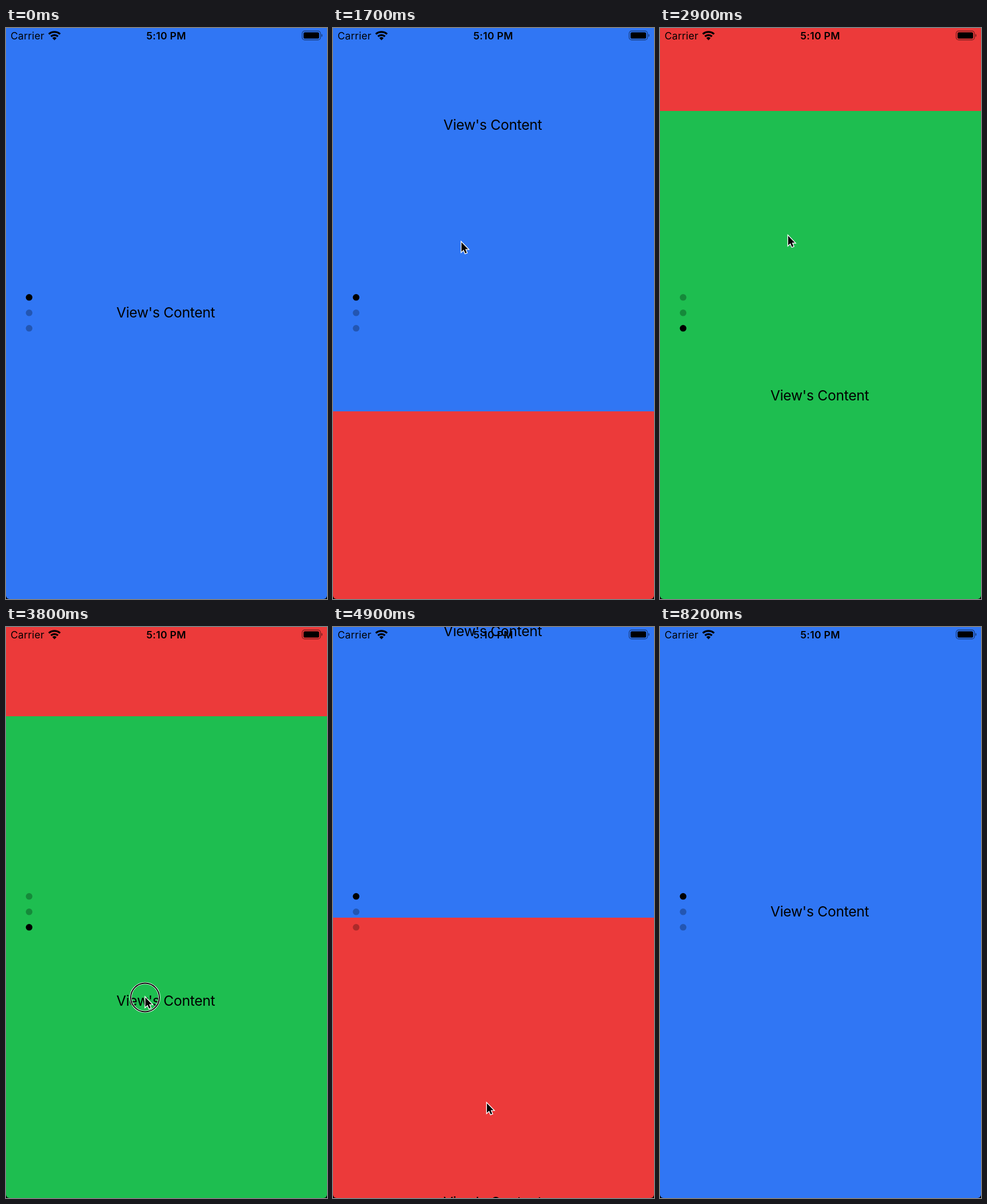
An HTML page with a canvas for the animation above (8.3 s loop, 561 by 998 pixels).

```html
<!DOCTYPE html>
<html lang="en">
<head>
<meta charset="utf-8">
<title>Vertical pages</title>
<style>
  html, body { margin: 0; width: 100%; height: 100%; overflow: hidden; background: #000; }
  #stage {
    position: absolute; left: 0; top: 0; width: 561px; height: 998px; overflow: hidden;
    border-radius: 0 0 6px 6px; color: #000; font-family: Inter, Roboto, sans-serif;
  }
  .page {
    position: absolute; left: 0; top: 0; width: 558.4px; padding-right: 2.6px; height: 998px;
    line-height: 995px; font-size: 24.6px; letter-spacing: -0.27px; text-align: center;
    white-space: nowrap;
  }
  .bar { position: absolute; top: 0; line-height: 27px; font-size: 17.6px; white-space: nowrap; }
  #carrier { left: 8px; letter-spacing: 0.2px; }
  #clock { left: 0; width: 560px; text-align: center; font-weight: 600; letter-spacing: 0.3px; }
  canvas { position: absolute; left: 0; top: 0; }
</style>
</head>
<body>
<div id="stage">
  <div class="page" style="background:#3076f4">View's Content</div>
  <div class="page" style="background:#ec3a3a">View's Content</div>
  <div class="page" style="background:#1ebe50">View's Content</div>
  <div class="bar" id="carrier">Carrier</div>
  <div class="bar" id="clock">5:10 PM</div>
  <canvas id="overlay" width="561" height="998"></canvas>
</div>
<script>
const LOOP = 8300, STEP = 100, H = 998;
const pages = [...document.querySelectorAll('.page')];
const ctx = document.getElementById('overlay').getContext('2d');

// Each swipe: finger down, drag start, release, settle time, page change, dragged distance
const swipes = [
  { press: 1300, start: 1400, release: 1700, settle: 500, dir: 1, drag: 328 },
  { press: 2400, start: 2400, release: 2700, settle: 500, dir: 1, drag: 328 },
  { press: 3500, start: 3600, release: 3850, settle: 440, dir: -1, drag: 218 },
  { press: 4500, start: 4600, release: 4850, settle: 450, dir: -1, drag: 300 }
];

// Pointer path: time, x, y
const path = [
  [1000, 40, 640], [1300, 228, 735], [1400, 228, 735], [1700, 224.5, 374.5],
  [1900, 222, 345], [2300, 215.5, 726], [2400, 215.5, 725], [2700, 222, 370],
  [3000, 225, 360], [3500, 240, 478], [3600, 240, 482], [3800, 243.5, 647.5],
  [3900, 246, 750], [4100, 252, 790], [4500, 281, 530.5], [4600, 281, 530.5],
  [4850, 270, 820], [5000, 267, 857.5], [6100, 267, 857.5], [6400, 12, 810]
];

function scrollAt(t) {
  let y = 0;
  for (const s of swipes) {
    if (t <= s.start) break;
    let d;
    if (t < s.release) {
      d = s.drag * ((t - s.start) / (s.release - s.start)) ** 1.5;
    } else {
      const u = Math.min(1, (t - s.release) / s.settle);
      d = H - (H - s.drag) * (1 - u) ** 3;
    }
    y += s.dir * d;
  }
  return y;
}

function pointerAt(t) {
  for (let i = 1; i < path.length; i++) {
    const a = path[i - 1], b = path[i];
    if (t >= a[0] && t < b[0]) {
      const u = (t - a[0]) / (b[0] - a[0]);
      return [a[1] + (b[1] - a[1]) * u, a[2] + (b[2] - a[2]) * u];
    }
  }
  return null;
}

function disc(x, y, r, alpha) {
  ctx.fillStyle = `rgba(0,0,0,${alpha})`;
  ctx.beginPath();
  ctx.arc(x, y, r, 0, Math.PI * 2);
  ctx.fill();
}

function roundBox(x, y, w, h, r) {
  ctx.beginPath();
  ctx.roundRect(x, y, w, h, r);
}

function drawStatus() {
  const x = 84.7, y = 21.6, half = 0.73, up = -Math.PI / 2;
  ctx.fillStyle = ctx.strokeStyle = '#000';
  ctx.beginPath();
  ctx.moveTo(x, y);
  ctx.arc(x, y, 5.6, up - half, up + half);
  ctx.fill();
  ctx.lineWidth = 3.2;
  for (const r of [9.2, 14.8]) {
    ctx.beginPath();
    ctx.arc(x, y, r, up - half, up + half);
    ctx.stroke();
  }

  ctx.strokeStyle = ctx.fillStyle = 'rgba(0,0,0,0.45)';
  ctx.lineWidth = 1.4;
  roundBox(517.6, 5.2, 32, 15.6, 4.4);
  ctx.stroke();
  roundBox(551.2, 10.4, 1.8, 5.2, [0, 1.8, 1.8, 0]);
  ctx.fill();
  ctx.fillStyle = '#000';
  roundBox(520, 7.5, 27.2, 11, 2.6);
  ctx.fill();
}

function ring(x, y) {
  ctx.beginPath();
  ctx.arc(x, y, 25, 0, Math.PI * 2);
  ctx.strokeStyle = '#fff';
  ctx.lineWidth = 3.6;
  ctx.stroke();
  ctx.strokeStyle = '#000';
  ctx.lineWidth = 1.9;
  ctx.stroke();
}

const arrow = new Path2D('M0 0V16.5L3.9 13L6.6 19.3L9.3 18.2L6.6 12H11.6Z');

function drawPointer(x, y) {
  ctx.save();
  ctx.translate(x, y);
  ctx.strokeStyle = '#fff';
  ctx.lineWidth = 2.6;
  ctx.stroke(arrow);
  ctx.fillStyle = '#000';
  ctx.fill(arrow);
  ctx.restore();
}

function draw(t) {
  const scroll = scrollAt(t);
  const current = Math.round(scroll / H);
  pages.forEach((p, i) => { p.style.transform = `translateY(${Math.round(i * H - scroll)}px)`; });

  ctx.clearRect(0, 0, 561, H);
  drawStatus();
  pages.forEach((p, i) => disc(40.4, 470.8 + 27 * i, 5.8, i === current ? 1 : 0.27));

  const pos = pointerAt(t);
  if (!pos) return;
  if (swipes.some(s => t >= s.press && t < s.release)) ring(pos[0] - 0.5, pos[1]);
  drawPointer(...pos);
}

const begin = performance.now();
function tick() {
  const t = (performance.now() - begin) % LOOP;
  draw(Math.floor(t / STEP) * STEP);
  requestAnimationFrame(tick);
}
tick();
</script>
</body>
</html>
```
